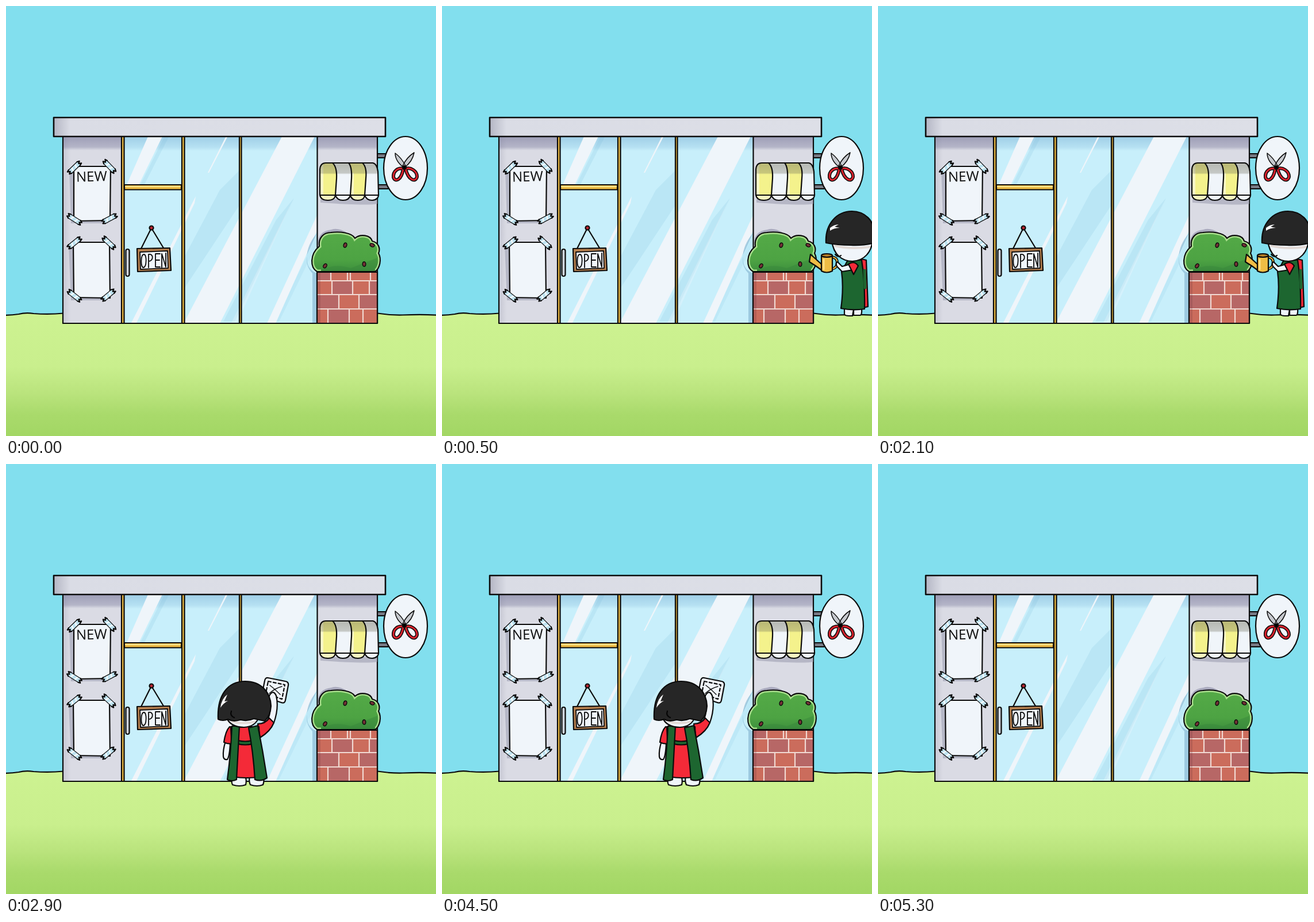
Recreate the animation shown at these times as an HTML page. Size 748x748 px, loop 8 s.

```html
<!DOCTYPE html>
<html lang="en">
<head>
<meta charset="utf-8">
<title>Salon front</title>
<style>
html, body { margin: 0; width: 100%; height: 100%; overflow: hidden; background: #82dfee; }
svg { display: block; width: 100vw; height: 100vh; }
.ink { stroke: #0b0b0b; stroke-width: 2.2; stroke-linejoin: round; stroke-linecap: round; }
.bold { stroke-width: 2.6; }
.line { fill: none; }
.white { fill: #f0f5fa; }
.red { fill: #f42a38; }
.green { fill: #1d6630; }
.gold { fill: #efbd45; }
.hair { fill: #262626; }
.gardener, .wiper, .pour, .cloth, .reach { animation: 8s step-end infinite; }
.gardener { animation-name: gardener; }
.wiper { animation-name: wiper; }
.pour { animation-name: pour; transform-origin: 722px 455px; }
.cloth { animation-name: cloth; }
.reach { animation-name: reach; transform-origin: 455px 455px; }
@keyframes gardener {
  0%, 36.25%, 100% { visibility: hidden; }
  6.25% { visibility: visible; }
}
@keyframes wiper {
  0%, 66.25%, 100% { visibility: hidden; }
  36.25% { visibility: visible; }
}
@keyframes pour {
  0%, 26.25%, 100% { transform: none; }
  16.25% { transform: rotate(-10deg); }
}
@keyframes cloth {
  0%, 56.25%, 100% { transform: none; }
  46.25% { transform: translate(30px, -12px); }
}
@keyframes reach {
  0%, 56.25%, 100% { transform: none; }
  46.25% { transform: rotate(24deg) scale(1.15); }
}
</style>
</head>
<body>
<svg viewBox="0 0 748 748">
  <defs>
    <linearGradient id="grass" x2="0" y2="1">
      <stop offset="0" stop-color="#cdf291"/><stop offset=".42" stop-color="#c9ef8d"/>
      <stop offset=".64" stop-color="#b9e37c"/><stop offset=".8" stop-color="#a9da6b"/>
      <stop offset="1" stop-color="#a1d663"/>
    </linearGradient>
    <linearGradient id="wall">
      <stop offset="0" stop-color="#c6c7d3"/><stop offset=".025" stop-color="#dadbe4"/>
      <stop offset="1" stop-color="#dadbe4"/>
    </linearGradient>
    <linearGradient id="roof">
      <stop offset="0" stop-color="#b4b6c4"/><stop offset=".05" stop-color="#dadce5"/>
      <stop offset="1" stop-color="#dddfe7"/>
    </linearGradient>
    <linearGradient id="eave" x2="0" y2="1">
      <stop offset="0" stop-color="#77779a" stop-opacity=".6"/>
      <stop offset=".75" stop-color="#77779a" stop-opacity=".38"/>
      <stop offset="1" stop-color="#77779a" stop-opacity="0"/>
    </linearGradient>
    <linearGradient id="glassEave" x2="0" y2="1">
      <stop offset="0" stop-color="#70a9d0" stop-opacity=".45"/>
      <stop offset=".75" stop-color="#70a9d0" stop-opacity=".2"/>
      <stop offset="1" stop-color="#70a9d0" stop-opacity="0"/>
    </linearGradient>
    <linearGradient id="awningShade" x2="0" y2="1">
      <stop offset="0" stop-color="#6b6b58" stop-opacity=".45"/>
      <stop offset=".32" stop-color="#6b6b58" stop-opacity=".32"/>
      <stop offset=".36" stop-color="#6b6b58" stop-opacity="0"/>
    </linearGradient>
    <linearGradient id="leaf" x2="0" y2="1">
      <stop offset="0" stop-color="#54aa47"/><stop offset=".7" stop-color="#4da343"/>
      <stop offset="1" stop-color="#3d8f3d"/>
    </linearGradient>
    <clipPath id="glass"><rect x="205" y="228" width="336" height="323"/></clipPath>
    <clipPath id="bricks"><rect x="541" y="463" width="105" height="89"/></clipPath>
    <path id="awningTop" d="M546 329V284Q547 273 556 273H638Q645 274 647 288L648 329Z"/>
    <clipPath id="awning"><use href="#awningTop"/></clipPath>
    <path id="bushShape" d="M541 462C529 455 528 432 545 418C543 404 552 394 565 394C580 392 602 394 607 404C616 396 634 398 637 409C647 411 652 421 648 430C654 441 650 457 642 462Z"/>
    <clipPath id="bush"><use href="#bushShape"/></clipPath>
    <path id="grips" d="M691 283C682 281 673 287 674 298C677 307 688 303 691 283ZM695 283C704 280 715 287 715 297C713 307 700 304 695 283Z"/>
    <g id="tape">
      <path d="M-11 -4H11V4H-11Z" fill="#bfe3f1"/>
      <path d="M-3 -4L-6 4M5 -4L2 4" fill="none" stroke="#f4fbff" stroke-width="2.5"/>
      <path d="M-11 -4H11M-11 4H11" class="ink" style="stroke-width:1.2"/>
      <path d="M-10 -4L-14 -3L-10 0L-14 2L-10 4M10 -4L14 -2L10 0L14 3L10 4" class="ink line"/>
    </g>
    <ellipse id="berry" rx="2.8" ry="4" fill="#743136" class="ink" style="stroke-width:1.4"/>
  </defs>

  <rect width="748" height="748" fill="#82dfee"/>
  <path d="M-5 538Q10 538 22 536Q34 533 48 535Q75 537 100 534.500H646Q668 538 690 537.500Q725 536 755 538V755H-5Z" fill="url(#grass)" class="ink"/>

  <!-- sign on the side wall -->
  <g class="ink">
    <rect x="645" y="257" width="16" height="7" fill="#777a84"/>
    <rect x="645" y="311" width="20" height="7" fill="#777a84"/>
    <ellipse cx="695" cy="282" rx="38" ry="55" class="white"/>
    <path d="M692 281Q677 270 677 256Q688 264 695 278ZM693 281Q707 271 710 255Q697 263 690 278Z" fill="#c6c9ce" stroke-width="1.5"/>
    <use href="#grips" class="line" style="stroke-width:6"/>
    <use href="#grips" class="line" style="stroke:#d9212c;stroke-width:3"/>
    <circle cx="693" cy="281" r="3"/>
  </g>

  <!-- building -->
  <rect x="99" y="227" width="547" height="325" fill="url(#wall)" class="ink"/>
  <rect x="100" y="228" width="103" height="23" fill="url(#eave)"/>
  <rect x="542" y="228" width="103" height="23" fill="url(#eave)"/>

  <g clip-path="url(#glass)">
    <rect x="205" y="227" width="337" height="325" fill="#c8effb"/>
    <g fill="#bae6f5">
      <path d="M407 285L372 320L311 435V490L407 345ZM275 228H283L241 310H234Z"/>
      <path d="M501 334L470 372L378 549H398Z"/>
      <path d="M541 398L468 549H475L541 414Z" opacity=".7"/>
    </g>
    <rect x="205" y="228" width="337" height="24" fill="url(#glassEave)"/>
    <g fill="#eff5fa">
      <path d="M247 227H272L231 311H210ZM382 228H385L353 290H351Z"/>
      <path d="M330 331L328 343L227 551H218Z"/>
      <path d="M480 227H537L372 552H309Z"/>
      <path d="M499 337L402 551H392Z" opacity=".3"/>
      <path d="M541 364V391L469 552H454Z"/>
    </g>
    <path d="M541 395Q520 420 524 445Q526 459 541 465V552H533V465Q520 452 524 432Z" fill="#86b7d3" opacity=".65"/>
  </g>

  <!-- frames between the panes -->
  <g class="ink gold">
    <rect x="201" y="227" width="4.500" height="325"/>
    <rect x="306" y="227" width="4.500" height="325"/>
    <rect x="406" y="227" width="3.500" height="325"/>
    <rect x="206" y="311" width="99" height="8.500"/>
  </g>
  <path d="M207 314H304" stroke="#ffe291" stroke-width="2"/>
  <path d="M541.500 227V552M99 552H646" class="ink line"/>
  <rect x="83" y="194" width="577" height="33" fill="url(#roof)" class="ink bold"/>

  <!-- posters -->
  <path d="M110 284H118V374H178V378H113ZM109 416H117V508H177V512H113Z" fill="#a9abbd" opacity=".75"/>
  <path d="M118 279H182L181 373L118 374ZM117 411H180L181 508L118 507Z" class="ink white"/>
  <use href="#tape" transform="translate(119 281) rotate(-44)"/>
  <use href="#tape" transform="translate(180 279) rotate(46)"/>
  <use href="#tape" transform="translate(119 371) rotate(32)"/>
  <use href="#tape" transform="translate(180 370) rotate(-28)"/>
  <use href="#tape" transform="translate(119 412) rotate(-39)"/>
  <use href="#tape" transform="translate(179 412) rotate(43)"/>
  <use href="#tape" transform="translate(119 504) rotate(38)"/>
  <use href="#tape" transform="translate(178 503) rotate(-40)"/>
  <text x="122" y="305" transform="rotate(-1.500 148 297)" font-family="'Open Sans', sans-serif" font-size="24" font-weight="500" fill="#0b0b0b">NEW</text>

  <!-- door -->
  <rect x="208.500" y="423" width="6" height="47" rx="3" fill="#cfd6de" class="ink"/>
  <path d="M252 388L235 422M254 388L274 421" class="ink line"/>
  <circle cx="253" cy="386" r="3.500" fill="#bb2530" class="ink"/>
  <g class="ink">
    <path d="M228 422L285 421L287 460L229 462Z" fill="#b98250"/>
    <path d="M233 428L281 426L282 456L234 458Z" class="white" style="stroke-width:1.8"/>
    <path class="line" role="img" aria-label="OPEN" d="M240 432C234 432 234 455 239 455C245 454 245 432 240 432ZM248 455V432C257 430 257 444 248 444M268 431H260V454H268M260 442H267M271 455V431L278 454V430" style="stroke-width:1.8"/>
  </g>

  <!-- awning -->
  <path d="M547 336H646V344Q630 348 547 342Z" fill="#9fa0b3" opacity=".6"/>
  <g class="ink white">
    <path d="M546 328Q547 338 560 338Q572 338 573 329ZM599 329Q601 338 612 338Q623 338 624 329Z" fill="#f7f6c0"/>
    <path d="M573 329Q576 338 586 338Q597 338 599 329ZM624 329Q627 338 637 338Q648 337 648 328Z"/>
  </g>
  <g clip-path="url(#awning)">
    <rect x="545" y="272" width="104" height="58" fill="#f0f5fa"/>
    <path d="M545 272H568Q576 280 575 300L573 330H545ZM596 272H620Q628 280 626 300L624 330H599L601 300Q602 280 596 272Z" fill="#f4f28c"/>
    <path d="M546 275H552V330H546ZM601 290H605V330H600Z" fill="#fbfac6"/>
    <rect x="545" y="272" width="104" height="58" fill="url(#awningShade)"/>
  </g>
  <g class="ink line">
    <use href="#awningTop"/>
    <path d="M568 273Q576 280 575 300L573 329M596 273Q602 280 601 300L599 329M620 273Q628 280 626 300L624 329"/>
  </g>

  <!-- planter -->
  <g clip-path="url(#bricks)">
    <rect x="541" y="463" width="105" height="89" fill="#cb6c5c"/>
    <path d="M567 478H603V502H567ZM632 478H646V502H632ZM541 502H579V527H541ZM614 502H646V527H614ZM560 527H597V552H560ZM541 463H565V478H541Z" fill="#b76766"/>
    <path d="M541 478H646M541 502H646M541 527H646M565 463V478M594 463V478M599 463V478M634 463V478M567 478V502M603 478V502M632 478V502M579 502V527M614 502V527M560 527V552M597 527V552M621 527V552" class="line" stroke="#f1d9d2" stroke-width="2.200"/>
    <path d="M541 463H547V552H541Z" fill="#632f3a" opacity=".2"/>
  </g>
  <rect x="541" y="463" width="105" height="89" class="ink line"/>
  <path d="M543 412Q543 392 566 389Q578 385 592 394L560 405Z" fill="#9293ac" opacity=".65"/>
  <use href="#bushShape" fill="url(#leaf)"/>
  <g clip-path="url(#bush)">
    <path d="M543 462Q570 446 600 456Q625 446 646 438V462Z" fill="#35833a" opacity=".4"/>
    <use href="#bushShape" fill="none" stroke="#a9df8c" stroke-width="7"/>
    <path d="M548 462H642" stroke="#3a8a3c" stroke-width="8"/>
  </g>
  <use href="#bushShape" class="ink line"/>
  <use href="#berry" transform="translate(590 416) rotate(20)"/>
  <use href="#berry" transform="translate(637 416) rotate(-65)"/>
  <use href="#berry" transform="translate(623 449)"/>
  <use href="#berry" transform="translate(555 452) rotate(35)"/>

  <!-- watering the bush -->
  <g class="gardener ink">
    <path d="M700 526V536Q701 539 708 539H714L716 528V538H727Q731 538 730 526Z" class="white"/>
    <path d="M729 440L738 442L741 523L732 525Z" class="red"/>
    <path d="M706 442H730Q736 480 735 527Q714 530 694 526Q699 490 695 462Z" class="green"/>
    <path d="M735 460L736 490" class="line" style="stroke:#1d6630;stroke-width:5"/>
    <path d="M678 408C681 434 697 444 714 444C735 443 747 428 749 408Z" class="white"/>
    <path d="M682 415Q710 422 745 417V421Q710 426 683 419Z" fill="#e2d9d5" stroke="none"/>
    <path d="M668 412C666 379 687 357 713 357C736 357 752 374 752 395V412Q735 417 711 416Q688 416 668 412Z" class="hair"/>
    <path d="M675 386Q682 380 690 380L683 384L692 386Q682 386 675 391Z" fill="#fff" stroke="none"/>
    <path d="M684 432Q689 438 694 434" class="line"/>
    <g class="pour">
      <path d="M679 437Q689 438 687 449Q686 456 679 457" class="line" style="stroke-width:5"/>
      <path d="M679 437Q689 438 687 449Q686 456 679 457" class="line" style="stroke:#efbd45;stroke-width:2"/>
      <path d="M641 432L650 440L661 450V460L650 452L639 445Z" class="gold"/>
      <path d="M660 434V461Q669 466 679 461V434Z" class="gold"/>
      <ellipse cx="669.500" cy="434" rx="9.500" ry="3" fill="#b77f27"/>
      <path d="M664 441V458" class="line" style="stroke:#ffe18a;stroke-width:3"/>
      <path d="M718 447L696 453L688 445Q684 447 687 453L696 462L715 459Z" class="white"/>
      <path d="M707 449Q717 442 724 452L716 467Z" class="red"/>
    </g>
  </g>

  <!-- wiping the window -->
  <g class="wiper ink">
    <g class="cloth">
      <path d="M456 372L486 378Q492 379 491 385L486 411Q485 417 479 415L450 405Q445 403 446 397L450 377Q451 371 456 372Z" class="white"/>
      <path d="M456 378L485 384L480 409L452 399Z" class="line" stroke-dasharray="5 4"/>
      <path d="M459 385Q467 391 477 401M480 387Q468 390 458 399" class="line" style="stroke-width:1.400"/>
    </g>
    <path class="reach white" d="M453 451Q462 432 459 416Q455 404 461 399Q466 394 470 403Q475 424 466 450Z"/>
    <path d="M382 482Q377 498 378 509Q379 515 385 514Q389 508 390 486Z" class="white"/>
    <path d="M395 542Q391 553 394 558Q406 562 417 558Q419 550 416 542ZM424 542Q422 552 425 558Q437 562 447 558Q450 551 447 542Z" class="white"/>
    <path d="M389 457Q382 464 379 484Q387 488 394 486L402 461Z" class="red"/>
    <path d="M438 452Q451 452 458 442L466 450Q460 465 442 476Z" class="red"/>
    <path d="M391 457H440L444 544Q418 548 395 544Z" class="red"/>
    <path d="M404 481Q416 484 428 481L429 487Q416 490 403 487Z" class="green"/>
    <path d="M393 456H406L401 549Q393 553 385 549Q391 505 393 456ZM422 459L438 455Q447 500 454 546Q444 553 433 549Q430 500 422 459Z" class="green"/>
    <path d="M383 440Q390 458 414 458Q434 457 440 440Z" class="white"/>
    <path d="M390 446Q412 452 435 446L433 450Q412 455 393 450Z" fill="#e2d9d5" stroke="none"/>
    <path d="M369 444C367 403 385 378 416 378C443 378 460 396 461 421Q460 438 450 447Q440 445 431 443Q420 448 408 445Q395 449 386 444Q377 448 369 444Z" class="hair"/>
    <path d="M373 424Q375 408 385 401L380 413L386 412Q378 416 373 424Z" fill="#fff" stroke="none"/>
    <path d="M392 430Q389 438 397 441" class="line" style="stroke:#050505"/>
  </g>
</svg>
</body>
</html>
```
